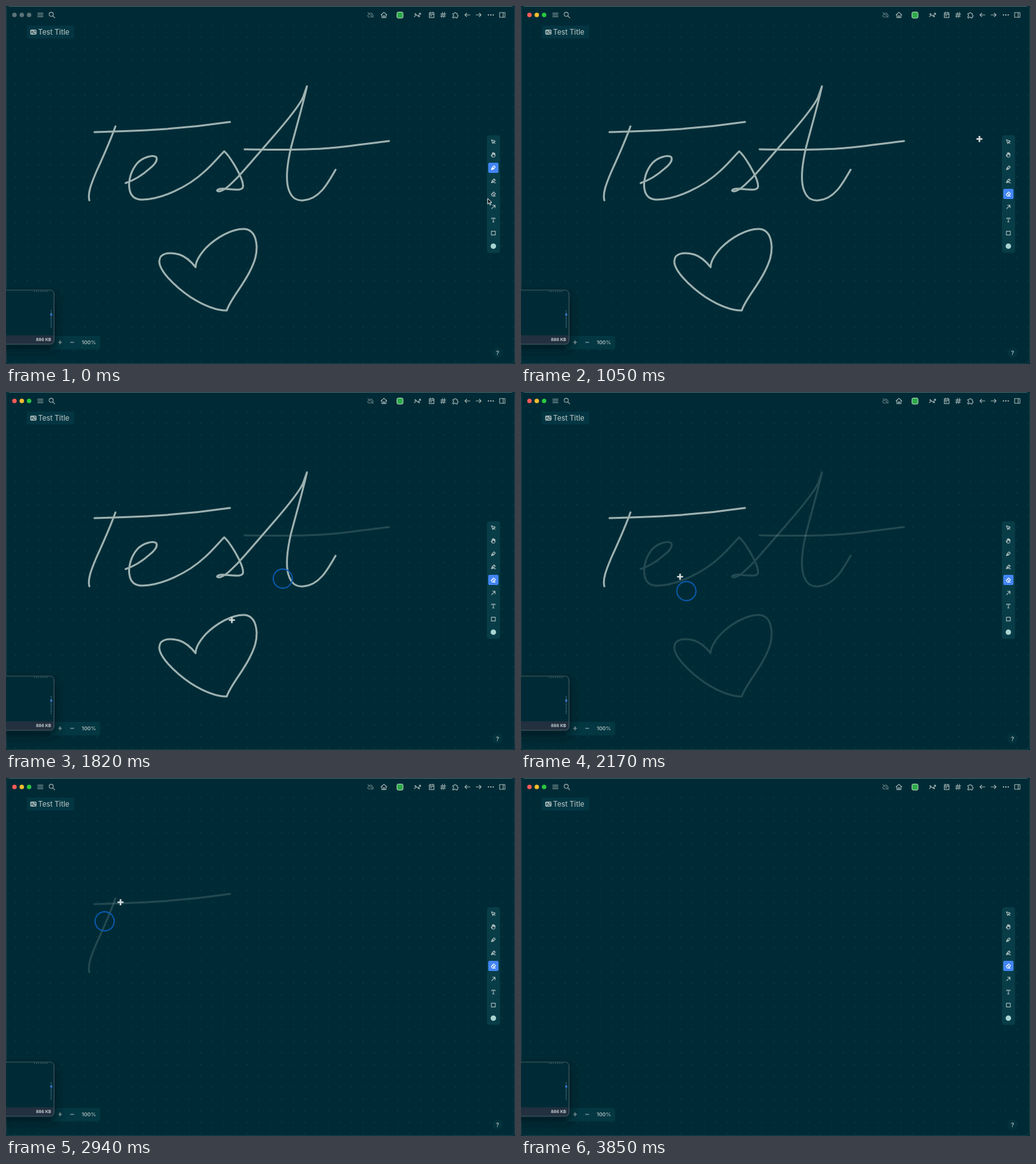
These frames come from a looping animation (800 by 562 pixels, 4.13 s). An HTML page:

```html
<!DOCTYPE html>
<html lang="en">
<head>
<meta charset="utf-8">
<title>Whiteboard eraser</title>
<style>
  html, body { margin: 0; height: 100%; overflow: hidden; background: #002b36; }
  svg { display: block; width: 800px; height: 562px; font-family: Inter, sans-serif; }
  .icon { fill: none; stroke: #9fb1b1; stroke-width: 2.4; stroke-linecap: round; stroke-linejoin: round; }
  .tool { stroke: #b3c2c2; stroke-width: 2.8; }
  .chosen { stroke: #fff; }
  #ink { fill: none; stroke: #9eb2b1; stroke-width: 3; stroke-linecap: round; stroke-linejoin: round; }
  text { fill: #a7b8b8; }
</style>
</head>
<body>
<svg viewBox="0 0 800 562">
  <defs>
    <pattern id="grid" x="5.9" y="21.9" width="18.2" height="18.2" patternUnits="userSpaceOnUse">
      <circle cx="9.1" cy="9.1" r=".7" fill="#1c4c54"/>
    </pattern>
    <filter id="soft" x="-50%" y="-50%" width="200%" height="200%"><feGaussianBlur stdDeviation="7"/></filter>
  </defs>
  <rect width="800" height="562" fill="#002b36"/>
  <rect y="28" width="800" height="534" fill="url(#grid)"/>
  <rect x=".5" y=".5" width="799" height="561" rx="6" fill="none" stroke="#183f49"/>
  <path d="M5 .5H795" stroke="#4a686f"/>

  <g id="ink">
    <path id="barT" d="M139 198C210 196 270 194 352 182"/>
    <path id="stemT" d="M172 189C162 217 150 242 142 260C134 279 128 294 131 305"/>
    <path id="est" d="M188 278C200 274 215 265 226 255C237 246 238 240 236 237C230 233 215 238 207 246C196 258 192 275 194 287C196 300 204 304 214 304C245 303 285 285 313 259C325 248 335 236 343 228C352 236 366 260 371 274C374 284 373 287 367 288C355 289 345 286 337 287C331 288 330 291 335 291C343 290 352 281 364 269C385 246 400 228 420 205C440 182 462 155 467 143L473 126C468 150 455 195 448 222C441 252 439 275 445 290C450 303 458 306 468 305C492 303 505 280 518 257"/>
    <path id="cross" d="M375 225C430 226 480 226 520 222C550 219 575 215 602 212"/>
    <path id="heart" d="M298 410C290 400 282 393 272 390C258 386 242 387 241 400C240 415 265 440 290 457C312 471 330 478 347 478C352 462 370 442 382 419C392 400 394 390 394 378C393 360 386 351 375 350C355 349 330 364 314 380C305 390 298 400 298 410"/>
  </g>

  <g id="lights"><circle cx="13.3" cy="14" r="3.5"/><circle cx="24.8" cy="14" r="3.5"/><circle cx="36.3" cy="14" r="3.5"/></g>
  <rect x="33" y="31" width="74" height="20" rx="3" fill="#033642"/>
  <rect x="38" y="37" width="10" height="8" rx="2" fill="#9fb1b1"/>
  <path d="M40 43v-3h2l1 3h3M44 39h2v2" fill="none" stroke="#033642" stroke-width=".9"/>
  <text x="50.5" y="45" font-size="11.2" font-weight="500">Test Title</text>
  <rect x="614.5" y="9.5" width="9.5" height="9.5" rx="2" fill="#2ea84a" stroke="#b5dcc0"/>

  <rect x="756" y="203" width="20.5" height="184.5" rx="4" fill="#083d48"/>
  <rect id="active" x="758" width="16" height="16" rx="2" fill="#4285f4"/>
  <g id="icons"></g>
  <circle cx="766" cy="377" r="4.3" fill="#a9d3d1"/>

  <rect x="70" y="518" width="78" height="21" rx="3" fill="#033742"/>
  <path d="M82 528h6M85 525v6M101 528h6" stroke="#a7b8b8" stroke-width="1.2"/>
  <text x="119" y="531.3" font-size="8.2" font-weight="600">100%</text>
  <circle cx="772.5" cy="544" r="8" fill="#03323d"/>
  <text x="772.5" y="547.5" font-size="9.5" font-weight="600" text-anchor="middle">?</text>

  <rect x="-12" y="452" width="92" height="88" rx="8" fill="#00161d" opacity=".65" filter="url(#soft)"/>
  <rect x="-10" y="446" width="85.5" height="85" rx="6" fill="#002b36"/>
  <path d="M0 517H75.5V525q0 6-6 6H0z" fill="#22303f"/>
  <rect x="-10" y="446" width="85.5" height="85" rx="6" fill="none" stroke="#4d666d" stroke-width=".9"/>
  <path d="M44 448h23" stroke="#6f8589" stroke-dasharray="1.3 2"/>
  <path d="M71 478v27" stroke="#3d7187" stroke-width="2" stroke-dasharray="1.3 1.6"/>
  <rect x="69.7" y="483" width="2.8" height="2.8" fill="#4285f4"/>
  <text x="71" y="526.3" font-size="6.8" font-weight="600" text-anchor="end" style="fill:#d9dfe2">886 KB</text>

  <circle id="ring" fill="none" stroke="#0b5cb5" stroke-width="1.8"/>
  <g id="cursor">
    <path d="M0 0V9L2.2 7 3.8 10.4 5.4 9.6 3.8 6.4H6.6z" fill="#061217" stroke="#e8eeee" stroke-width="1"/>
    <path d="M-.8 -1.5q1.5-1.5 2.3 0v3.2l4 .9q1.3.5 1 2l-.8 3.2H.2L-3.2 4q-.2-1.6 1.3-1.3l1.1 1z" fill="#fff" stroke="#10242b" stroke-width=".8"/>
    <path d="M-4.7 0H4.7M0 -4.7V4.7" stroke="#d3dada" stroke-width="2.6"/>
  </g>
</svg>
<script>
const $ = id => document.getElementById(id);
const LOOP = 4130, STEP = 70, LAST = 3850;

// Icons on a 24-unit grid: centre x, centre y, path, opacity
const pen = 'M4 20l3-9 8-7 5 5-7 8zM4 20l8-8';
const PEN_Y = 254, ERASER_Y = 295;
const icons = [
  [54, 14, 'M3 6h18M3 12h18M3 18h18'],
  [72, 14, 'M17 10a7 7 0 1 1-14 0a7 7 0 0 1 14 0M15 15l7 7'],
  [573, 14, 'M3 4l18 16M8 7a5 5 0 0 0-2 4a4 4 0 0 0 1 8h10M11 6q6-1 7 5q4 1 3 5', .6],
  [594, 14, 'M2 12l10-9 10 9M5 10v11h14V10M10 21v-6h4v6'],
  [647, 14, 'M1 18l7-7 5 5 9-10M17 6h5v5M2 9h4M4 7v4M15 17h4M17 15v4'],
  [669, 14, 'M4 5h16v16H4zM4 10h16M8 2v4M16 2v4M8 15h4'],
  [687, 14, 'M4 9h17M3 16h17M10 3L7 21M17 3l-3 18'],
  [706, 14, 'M4 7h5a3 3 0 1 1 6 0h4v5a3 3 0 1 1 0 6v4h-5a3 3 0 0 0-6 0H4v-5a3 3 0 0 0 0-6z'],
  [725, 14, 'M21 12H4M10 6l-6 6 6 6'],
  [743, 14, 'M3 12h17M14 6l6 6-6 6'],
  [762, 14, 'M3 11h2v2h-2zM11 11h2v2h-2zM19 11h2v2h-2z'],
  [780, 14, 'M3 4h18v16H3zM15 4v16'],
  [766, 213, 'M4 4l6 16 3-7 7-3zM13 13l6 6'],
  [766, 233.5, 'M7 14V6q1.500-2 3 0v5V4q1.500-2 3 0v7V5q1.500-2 3 0v7V8q2-2 3 0v8q-1 6-6 6h-3q-4-1-7-8q1-2 4 2'],
  [766, PEN_Y, pen],
  [766, 274.5, pen + 'M15 20h6'],
  [766, ERASER_Y, 'M3 14L13 4l8 7-9 10H8zM8 9l8 8M12 21h8'],
  [766, 315.5, 'M5 19L19 5M9 5h10v10'],
  [766, 336, 'M5 7V4h14v3M12 4v16M9 20h6'],
  [766, 356.5, 'M4 4h16v16H4z']
];
$('icons').innerHTML = icons.map(([x, y, d, o = 1]) => {
  const tool = y > 20;
  return `<path class="icon ${tool ? 'tool' : ''}" data-y="${y}" opacity="${o}" transform="translate(${x} ${y}) scale(${tool ? .38 : .46}) translate(-12 -12)" d="${d}"/>`;
}).join('');
const tools = [...document.querySelectorAll('.tool')];

// Pointer path: time, x, y
const path = [
  [0, 757, 302], [210, 757, 302], [420, 762, 297], [700, 762, 297],
  [980, 730, 225], [1260, 692, 160], [1470, 692, 160], [1680, 512, 200],
  [1750, 435, 293], [1820, 355, 358], [1890, 295, 385], [2030, 270, 335],
  [2170, 250, 290], [2380, 220, 270], [2660, 142, 283], [2730, 135, 283],
  [2870, 155, 225], [2940, 180, 195], [3080, 212.5, 184], [3290, 212.5, 184],
  [3500, 500, 70], [3640, 820, -20]
];
// When each stroke is touched and when it is removed
const erased = {
  cross: [1750, 2380], heart: [1890, 2380], est: [2100, 2380],
  stemT: [2730, 3150], barT: [2940, 3150]
};
const presses = [[420, 600], [1680, 2380], [2670, 3150]];
const clamp = v => Math.max(0, Math.min(1, v));

function pointerAt(t) {
  const i = path.findIndex(p => p[0] > t);
  if (i < 0) return path.at(-1).slice(1);
  if (i === 0) return path[0].slice(1);
  const [t0, x0, y0] = path[i - 1], [t1, x1, y1] = path[i];
  const k = (t - t0) / (t1 - t0);
  return [x0 + (x1 - x0) * k, y0 + (y1 - y0) * k];
}

function drawRing(t) {
  const press = presses.find(([down, up]) => t >= down && t < up + 140);
  const grow = press ? clamp((t - press[0]) / 140) : 0;
  const fade = press ? clamp((t - press[1]) / 140) : 0;
  const [x, y] = pointerAt(t - STEP);
  const ring = $('ring');
  ring.setAttribute('cx', x);
  ring.setAttribute('cy', y);
  ring.setAttribute('r', 13 + 2 * grow + 5 * fade);
  ring.setAttribute('opacity', Math.sqrt(grow) * (1 - fade) ** 1.4);
}

function draw(t) {
  for (const [id, [touch, gone]] of Object.entries(erased))
    $(id).setAttribute('opacity', t < touch ? 1 : t < gone ? .22 : 0);

  const colors = t < 140 ? ['#5c7378', '#5c7378', '#5c7378'] : ['#fc5b57', '#f5bd2f', '#2ac840'];
  [...$('lights').children].forEach((dot, i) => dot.setAttribute('fill', colors[i]));

  const chosenY = t < 630 ? PEN_Y : ERASER_Y;
  $('active').setAttribute('y', chosenY - 8);
  tools.forEach(tool => tool.classList.toggle('chosen', +tool.dataset.y === chosenY));

  drawRing(t);
  const shape = t < 350 ? 0 : t < 770 ? 1 : 2;
  $('cursor').setAttribute('transform', `translate(${pointerAt(t)})`);
  [...$('cursor').children].forEach((c, i) => c.setAttribute('visibility', i === shape ? 'visible' : 'hidden'));
}

function tick() {
  const t = performance.now() % LOOP;
  draw(Math.min(LAST, Math.floor(t / STEP) * STEP));
  requestAnimationFrame(tick);
}
tick();
</script>
</body>
</html>
```
